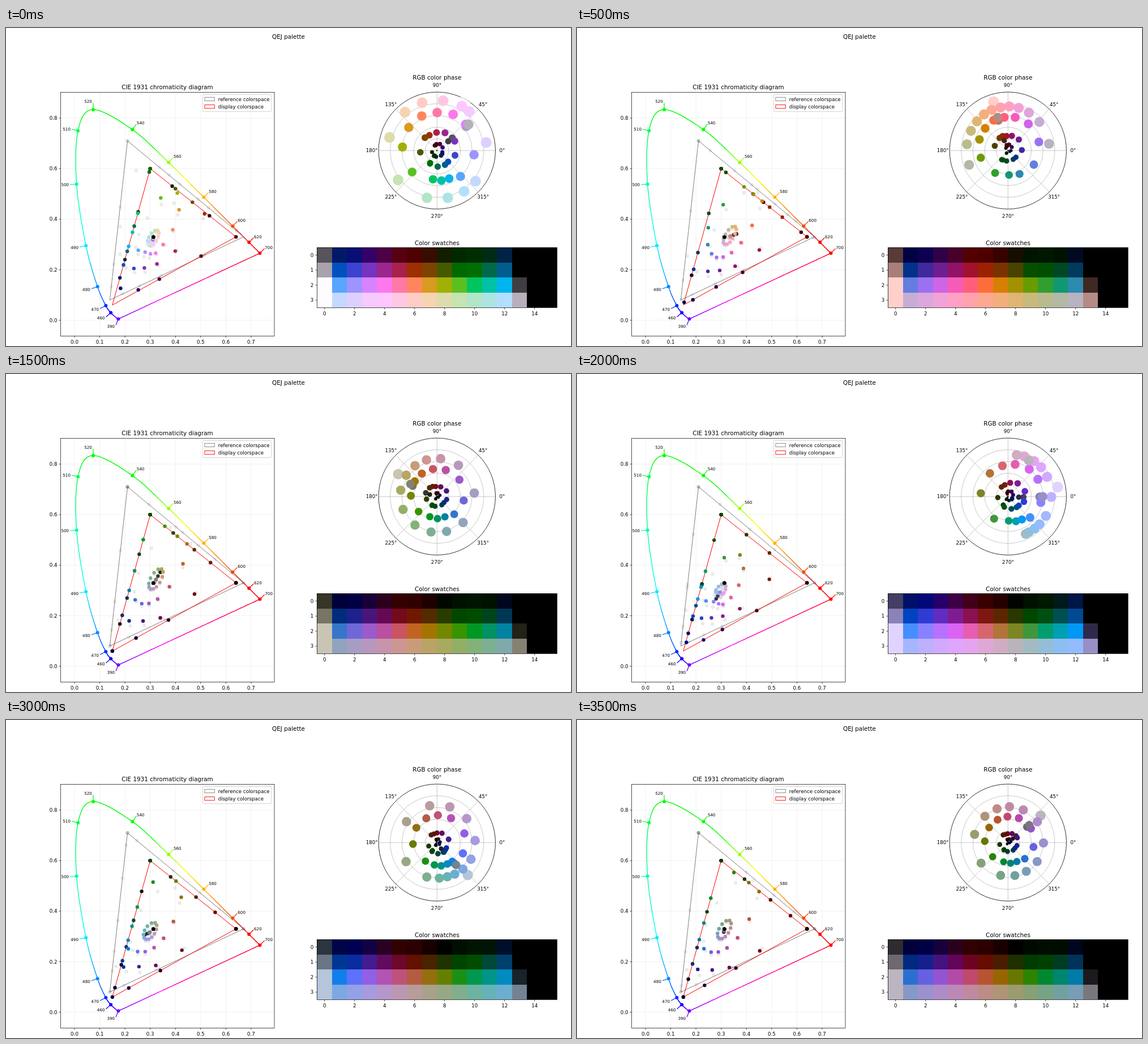
Animation of 998x561 px, one loop 4000 ms. Source, as an HTML page with a canvas:

```html
<!DOCTYPE html>
<html lang="en">
<head>
<meta charset="utf-8">
<title>QEJ palette</title>
<style>
  html, body { margin: 0; width: 100%; height: 100%; overflow: hidden; background: #fff; }
  canvas { display: block; }
</style>
</head>
<body>
<canvas id="stage" width="998" height="561"></canvas>
<script>
const ctx = document.getElementById('stage').getContext('2d');
const STEP = 500, STATES = 8;
const TITLE = 10.4, BODY = 8.67, SMALL = 7.2;
const HAIRLINE = 0.7;

// ---------- colour spaces ----------

const clamp = v => Math.min(1, Math.max(0, v));
const rad = deg => deg * Math.PI / 180;
const css = rgb => `rgb(${rgb.map(v => Math.round(v * 255))})`;
const inner = (a, b) => a[0] * b[0] + a[1] * b[1] + a[2] * b[2];
const apply = (m, v) => m.map(row => inner(row, v));
const transpose = m => m[0].map((_, i) => m.map(row => row[i]));
const cross = (a, b) => [a[1] * b[2] - a[2] * b[1], a[2] * b[0] - a[0] * b[2], a[0] * b[1] - a[1] * b[0]];

function inverse([a, b, c]) {
  const columns = [cross(b, c), cross(c, a), cross(a, b)];
  const det = inner(a, columns[0]);
  return transpose(columns.map(col => col.map(v => v / det)));
}

const xyz = ([x, y]) => [x / y, 1, (1 - x - y) / y];

function rgbToXyz({ corners, white }) {
  const primaries = transpose(corners.map(xyz));
  const scale = apply(inverse(primaries), xyz(white));
  return primaries.map(row => row.map((v, i) => v * scale[i]));
}

const NTSC = { name: 'reference colorspace', color: '#808080', white: [.3101, .3162], corners: [[.67, .33], [.21, .71], [.14, .08]] };
const SRGB = { name: 'display colorspace', color: '#f00', white: [.3127, .329], corners: [[.64, .33], [.3, .6], [.15, .06]] };
const NTSC_XYZ = rgbToXyz(NTSC), SRGB_XYZ = rgbToXyz(SRGB), XYZ_SRGB = inverse(SRGB_XYZ);

// BT.709 transfer curve
const toLinear = v => v < .081 ? v / 4.5 : ((v + .099) / 1.099) ** (1 / .45);
const toSignal = v => v < .018 ? v * 4.5 : 1.099 * v ** .45 - .099;

function chromaticity(matrix, rgb) {
  const [x, y, z] = apply(matrix, rgb), sum = x + y + z;
  return sum > 1e-9 ? [x / sum, y / sum] : SRGB.white;
}

// ---------- composite signal to RGB ----------

// Levels in mV: [normal, attenuated][low, high][row]
const LEVELS = [
  [[228, 312, 552, 880], [616, 840, 1100, 1100]],
  [[192, 256, 448, 712], [500, 676, 896, 896]]
];
const BLACK = 312, WHITE = 1100, SETUP = .075;
const BURST = 376 * 7 * 3.8637;

function makeColor(row, col, emphasis) {
  let y = 0, u = 0, v = 0;
  for (let k = 0; k < 12; k++) {
    const angle = 15 + 30 * k;
    const inPhase = hue => Math.cos(rad(angle - hue)) > 0;
    const high = col === 0 || (col < 13 && inPhase(30 * (col - 2)));
    const dimmed = [0, 1, 2].some(bit => emphasis >> bit & 1 && inPhase(300 + 120 * bit));
    const level = col > 13 ? BLACK : LEVELS[+dimmed][+high][row];
    y += (level - BLACK) / (WHITE - BLACK) / 12;
    u += level * Math.cos(rad(angle)) / BURST;
    v += level * Math.sin(rad(angle)) / BURST;
  }
  y = (y - SETUP) / (1 - SETUP);
  [u, v] = [u, v].map(c => c / (1 - SETUP) ** 2);
  const rgb = [y + 1.14 * v, y - .395 * u - .581 * v, y + 2.032 * u];
  const linear = apply(XYZ_SRGB, apply(NTSC_XYZ, rgb.map(toLinear)));
  return { row, col, reference: rgb.map(clamp), display: linear.map(c => clamp(toSignal(c))) };
}

const palettes = Array.from({ length: STATES }, (_, emphasis) =>
  Array.from({ length: 64 }, (_, i) => makeColor(i >> 4, i & 15, emphasis)));

// ---------- drawing helpers ----------

function text(string, x, middle, size = BODY, align = 'center') {
  ctx.font = `${size}px "DejaVu Sans", sans-serif`;
  ctx.textAlign = align;
  ctx.fillStyle = '#000';
  ctx.fillText(string, x, middle + size * .365);
}

function line(points, color, width = HAIRLINE, close = false) {
  ctx.beginPath();
  points.forEach(p => ctx.lineTo(...p));
  if (close) ctx.closePath();
  ctx.strokeStyle = color;
  ctx.lineWidth = width;
  ctx.stroke();
}

function box(x, y, w, h, color, width = HAIRLINE) {
  ctx.strokeStyle = color;
  ctx.lineWidth = width;
  ctx.strokeRect(x, y, w, h);
}

function dot(x, y, r, color) {
  ctx.beginPath();
  ctx.arc(x, y, r, 0, 2 * Math.PI);
  ctx.fillStyle = color;
  ctx.fill();
}

function ring(x, y, r, color, width = HAIRLINE) {
  ctx.beginPath();
  ctx.arc(x, y, r, 0, 2 * Math.PI);
  ctx.strokeStyle = color;
  ctx.lineWidth = width;
  ctx.stroke();
}

// ---------- chromaticity diagram ----------

const PLOT = { left: 96.5, top: 113.5, right: 474, bottom: 543.5 };
const toPixel = ([x, y]) => [121 + x * 445.7, 515.5 - y * 445.7];

// Key points of the spectral locus: x, y, wavelength to label
const LOCUS = [
  [.1738, .0049, 390], [.1689, .0069], [.1440, .0297, 460], [.1241, .0578, 470],
  [.0913, .1327, 480], [.0454, .2950, 490], [.0082, .5384, 500], [.0139, .7502, 510],
  [.0743, .8338, 520], [.2296, .7543, 540], [.3731, .6245, 560], [.5125, .4866, 580],
  [.6270, .3725, 600], [.6915, .3083, 620], [.7347, .2653, 700]
];
const LAST = LOCUS.length - 1;
const locusAt = i => LOCUS[Math.min(LAST, Math.max(0, i))].slice(0, 2);

function spectralColor([x, y]) {
  const rgb = apply(XYZ_SRGB, [x, y, 1 - x - y]).map(c => Math.max(0, c));
  const peak = Math.max(...rgb);
  return css(rgb.map(c => (c / peak) ** (1 / 2.2)));
}

// Catmull-Rom between b and c
function spline(a, b, c, d, t) {
  return b.map((_, i) => b[i] + t / 2 * (c[i] - a[i]
    + t * (2 * a[i] - 5 * b[i] + 4 * c[i] - d[i] + t * (3 * (b[i] - c[i]) + d[i] - a[i]))));
}

function locusPath() {
  const path = [], start = locusAt(0), end = locusAt(LAST);
  for (let i = 0; i < LAST; i++)
    for (let t = 0; t < 1; t += 1 / 16)
      path.push(spline(...[-1, 0, 1, 2].map(k => locusAt(i + k)), t));
  for (let t = 0; t <= 60; t++) path.push(end.map((v, k) => v + (start[k] - v) * t / 60));
  return path;
}
const locus = locusPath();

function drawMark(index) {
  const wavelength = LOCUS[index][2];
  if (!wavelength) return;
  const [x, y] = toPixel(locusAt(index)), color = spectralColor(locusAt(index));
  const [x0, y0] = toPixel(locusAt(index - 1)), [x1, y1] = toPixel(locusAt(index + 1));
  const scale = 11.5 / Math.hypot(x1 - x0, y1 - y0);
  const dx = (y1 - y0) * scale, dy = (x0 - x1) * scale;
  line([[x, y], [x + dx, y + dy]], color, 1.3);
  dot(x, y, 3, color);
  const [gap, align] = dx < 0 ? [-2, 'right'] : [.7, 'left'];
  text(wavelength, x + dx + gap, y + dy * 1.25, SMALL, align);
}

function drawDiagram(palette) {
  const { left, top, right, bottom } = PLOT;
  for (let i = 0; i < 8; i++) {
    const [x] = toPixel([i / 10, 0]);
    line([[x, top], [x, bottom]], '#ebebeb');
    line([[x, bottom], [x, bottom + 3]], '#000');
    text((i / 10).toFixed(1), x, 553.5);
  }
  for (let i = 0; i < 5; i++) {
    const [, y] = toPixel([0, i / 5]);
    line([[left, y], [right, y]], '#ebebeb');
    line([[left - 3, y], [left, y]], '#000');
    text((i / 5).toFixed(1), 90.5, y, BODY, 'right');
  }
  box(left, top, right - left, bottom - top, '#000');

  ctx.lineCap = 'round';
  for (let i = 1; i < locus.length; i++)
    line([toPixel(locus[i - 1]), toPixel(locus[i])], spectralColor(locus[i]), 1.35);
  ctx.lineCap = 'butt';
  LOCUS.forEach((_, i) => drawMark(i));

  for (const { color, corners } of [NTSC, SRGB]) line(corners.map(toPixel), color, 1, true);
  for (const { reference } of palette) {
    const [x, y] = toPixel(chromaticity(NTSC_XYZ, reference));
    dot(x, y, 3, 'rgba(0,0,0,.07)');
    ring(x, y, 2.6, 'rgba(0,0,0,.05)', .9);
  }
  for (const { display } of palette)
    dot(...toPixel(chromaticity(SRGB_XYZ, display)), 3.2, css(display));

  ctx.beginPath();
  ctx.roundRect(347.5, 117.5, 121.5, 30, 2);
  ctx.fillStyle = 'rgba(255,255,255,.8)';
  ctx.fill();
  ctx.strokeStyle = '#d0d0d0';
  ctx.lineWidth = .9;
  ctx.stroke();
  [NTSC, SRGB].forEach(({ name, color }, i) => {
    box(351, 122.3 + 13.3 * i, 17.3, 6.2, color, .9);
    text(name, 374.8, 125.5 + 13.4 * i, BODY, 'left');
  });
  text('CIE 1931 chromaticity diagram', 285, 104.7, TITLE);
}

// ---------- polar plot ----------

const POLAR = { x: 761.3, y: 216.2, r: 103.2 };

function drawPolar(palette) {
  const { x, y, r } = POLAR;
  const at = (angle, radius) => [x + radius * Math.cos(angle), y - radius * Math.sin(angle)];
  for (let deg = 0; deg < 360; deg += 45) {
    line([[x, y], at(rad(deg), r)], '#b0b0b0');
    text(`${deg}°`, ...at(rad(deg), r + 12));
  }
  for (let i = 1; i < 5; i++) ring(x, y, r * i / 5, '#b0b0b0');
  ring(x, y, r, '#000', .8);

  ctx.save();
  ctx.beginPath();
  ctx.arc(x, y, r, 0, 2 * Math.PI);
  ctx.clip();
  for (const { display } of palette) {
    const luma = inner([.299, .587, .114], display);
    const hue = Math.atan2(.877 * (display[0] - luma), .492 * (display[2] - luma));
    dot(...at(hue, r * luma), .65 + 9.6 * Math.sqrt(luma), css(display));
  }
  ctx.restore();
  text('RGB color phase', x, 87.5, TITLE);
}

// ---------- swatches ----------

const SWATCH = { x: 549.4, y: 387.4, size: 26.5 };

function drawSwatches(palette) {
  const { x, y, size } = SWATCH;
  for (const { row, col, display } of palette) {
    const [x0, x1] = [col, col + 1].map(i => Math.round(x + i * size));
    const [y0, y1] = [row, row + 1].map(i => Math.round(y + i * size));
    ctx.fillStyle = css(display);
    ctx.fillRect(x0, y0, x1 - x0, y1 - y0);
  }
  box(x, y, 16 * size, 4 * size, '#000');
  const bottom = y + 4 * size;
  for (let i = 0; i < 16; i += 2) {
    const center = x + (i + .5) * size;
    line([[center, bottom], [center, bottom + 3]], '#000');
    text(i, center, 504);
  }
  for (let i = 0; i < 4; i++) {
    const center = y + (i + .5) * size;
    line([[x - 3, center], [x, center]], '#000');
    text(i, 543.3, center, BODY, 'right');
  }
  text('Color swatches', x + 8 * size, 379, TITLE);
}

// ---------- loop ----------

let shown = -1;
function tick(now) {
  const state = Math.floor(now / STEP) % STATES;
  if (state !== shown) {
    shown = state;
    ctx.fillStyle = '#fff';
    ctx.fillRect(0, 0, 998, 561);
    text('QEJ palette', 499, 15.7, TITLE);
    [drawDiagram, drawPolar, drawSwatches].forEach(draw => draw(palettes[state]));
  }
  requestAnimationFrame(tick);
}
tick(0);
</script>
</body>
</html>
```
